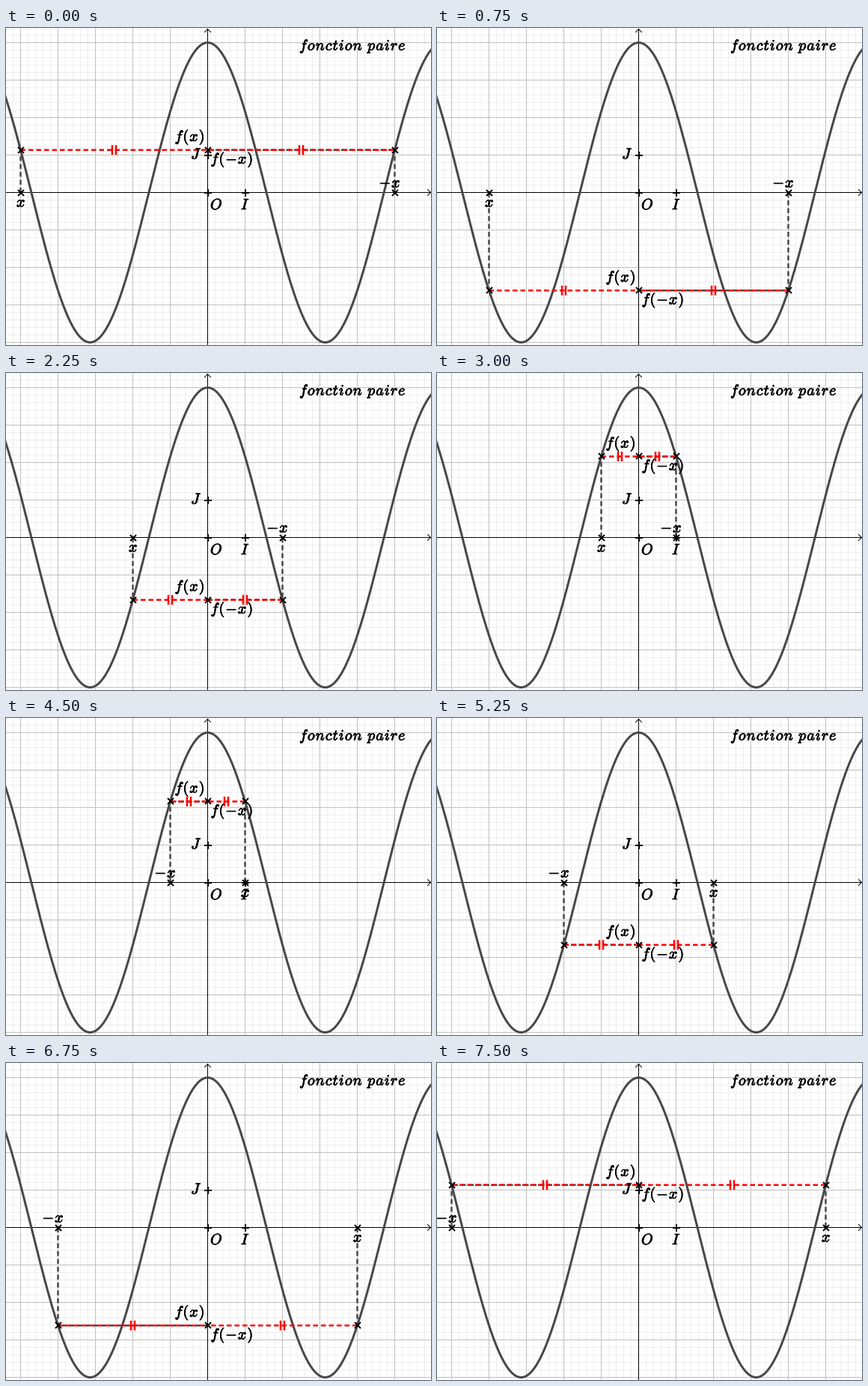
Recreate the animation shown at these times as a matplotlib script. Size 568 by 423 pixels, loop 8 s.

```python
import numpy as np
import matplotlib.pyplot as plt
from matplotlib.animation import FuncAnimation
from matplotlib.patheffects import withStroke

W, H, DPI = 568, 423, 64
PT = 72 / DPI                 # points per pixel
OX, OY, UNIT = 269, 219, 50   # axis origin and unit length, in pixels
STEP_MS, TICK_MS, LOOP_MS = 750, 250, 8000
DARK, RED = "#484848", "#ff0000"

plt.rcParams.update({
    "mathtext.fontset": "cm",
    "path.snap": False,
    "lines.scale_dashes": False,
    "toolbar": "None",
})

fig = plt.figure(figsize=(W / DPI, H / DPI), dpi=DPI, facecolor="white")
ax = fig.add_axes([0, 0, 1, 1])
ax.set_xlim(-0.5, W - 0.5)
ax.set_ylim(H - 0.5, -0.5)
ax.axis("off")


def f(x):
    return 4 * np.cos(x)


def px(x):
    return OX + UNIT * x


def py(y):
    return OY - UNIT * y


def line(xs, ys, width, color, z, **kw):
    return ax.plot(xs, ys, lw=width * PT, color=color, zorder=z, **kw)[0]


def dashed(color, z):
    return line([], [], 2.5, color, z, dashes=(6.5 * PT, 4 * PT),
                dash_capstyle="butt")


def marks(shape, half, z=6):
    return ax.plot([], [], linestyle="none", marker=shape, color="black",
                   ms=2 * half * PT, mew=2 * PT, zorder=z)[0]


def label(x, y, *parts):
    """Bold math italic with slightly open letter spacing."""
    text = "$" + r"\hspace{0.063}".join(parts) + "$"
    return ax.text(x, y, text, fontsize=20 * PT, color="black", zorder=8,
                   ha="left", va="baseline",
                   path_effects=[withStroke(linewidth=0.8 * PT,
                                            foreground="black")])


def draw_grid():
    for step, color, z in ((10, "#eeeeee", 0), (UNIT, "#c0c0c0", 1)):
        ax.vlines(np.arange(OX % step, W, step), -1, H, color=color,
                  lw=PT, zorder=z)
        ax.hlines(np.arange(OY % step, H, step), -1, W, color=color,
                  lw=PT, zorder=z)


def draw_axes():
    line([-1, W], [OY, OY], 1, "black", 2)
    line([OX, OX], [1, H], 1, "black", 2)
    line([W - 5, W - 1, W - 5], [OY - 4, OY, OY + 4], 1, "black", 2)
    line([OX - 4, OX, OX + 4], [5, 1, 5], 1, "black", 2)


draw_grid()
draw_axes()
xs = np.linspace(-OX / UNIT - 0.1, (W - OX) / UNIT + 0.1, 700)
line(px(xs), py(f(xs)), 3, DARK, 3)

units = marks("+", 5)
units.set_data([OX, px(1), OX], [OY, OY, py(1)])
label(391.5, 29, *"fonction", r"\hspace{0.3}", *"paire")
label(272.5, 241.5, "O")
label(313.5, 241.5, "I")
label(246.5, 174, "J")

drops = [dashed(DARK, 4), dashed(DARK, 4)]
under = dashed(DARK, 4)
spans = [dashed(RED, 5), dashed(RED, 5)]
ticks = [line([], [], 2.5, RED, 5, solid_capstyle="butt") for _ in range(4)]
points = marks("x", 4.3)
name_x = label(0, 238, "x")
name_neg = label(0, 212, "{-}", "x")
name_fx = label(225, 0, "f", "(", "x", ")")
name_fneg = label(273, 0, "f", "(", "{-}", "x", ")")


def draw(i):
    x = min(i * TICK_MS // STEP_MS, 10) - 5
    y = py(f(x))
    a, b = px(x), px(-x)

    for k, end in enumerate((a, b)):
        drops[k].set_data([end, end], [OY, y])
        spans[k].set_data([end, OX], [y, y])
        for j, shift in enumerate((-2.5, 2.5)):
            m = (end + OX) / 2 + shift
            tick = ticks[2 * k + j]
            tick.set_data([m, m], [y - 6.5, y + 6.5])
            tick.set_visible(x != 0)
    under.set_data([OX, b], [y, y])
    points.set_data([a, b, a, b, OX], [OY, OY, y, y, y])

    name_x.set_x(a - 5.5)
    name_neg.set_x(b - 21)
    name_fx.set_y(y - 12)
    name_fneg.set_y(y + 18)
    return [*drops, under, *spans, *ticks, points,
            name_x, name_neg, name_fx, name_fneg]


anim = FuncAnimation(fig, draw, frames=LOOP_MS // TICK_MS, interval=TICK_MS,
                     repeat=True, repeat_delay=0, blit=False)
plt.show()
```
